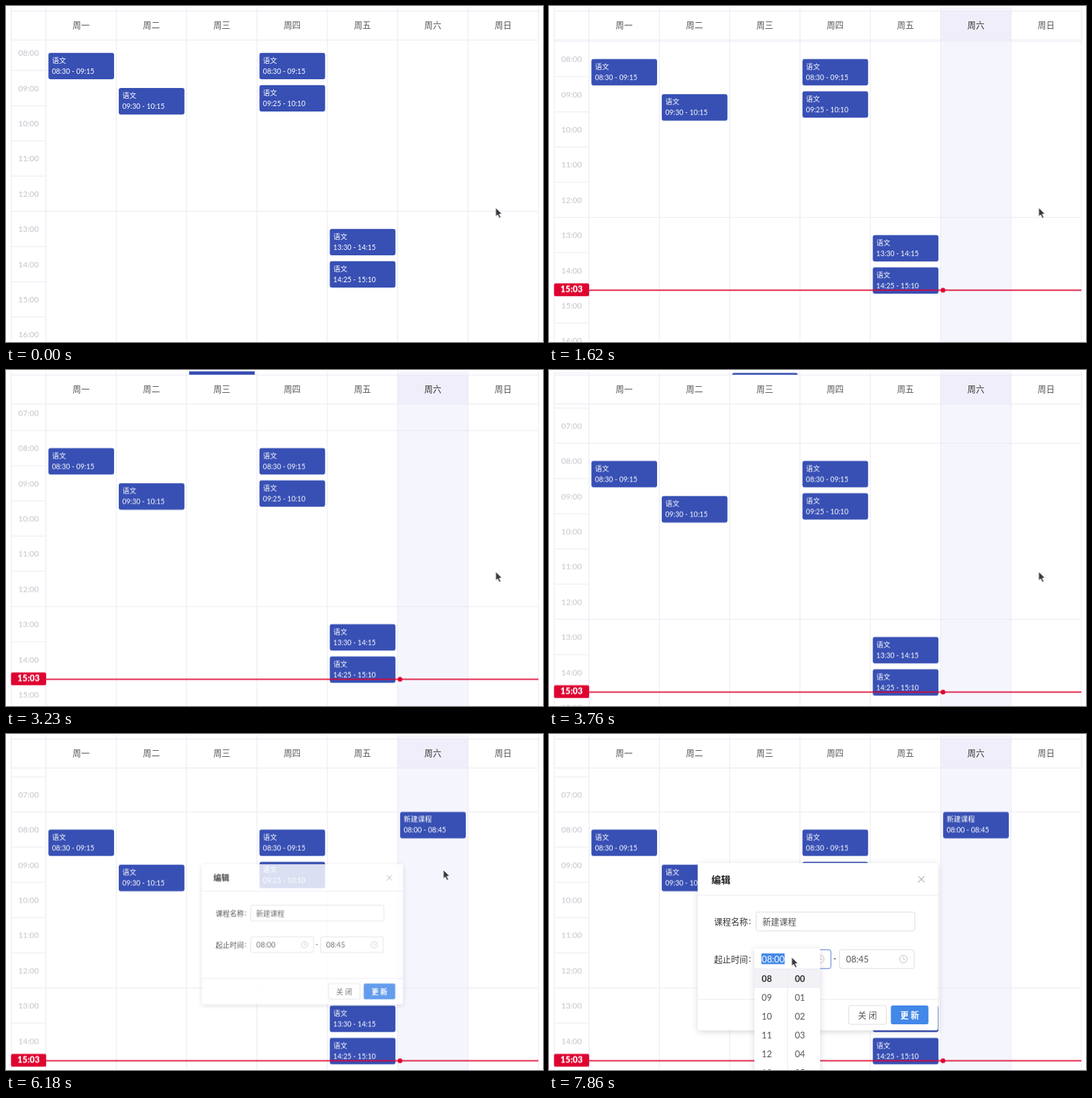
Write an HTML page that moves like this. It is 800 by 500 pixels and loops after 8 s.

```html
<!DOCTYPE html>
<html lang="zh-CN">
<head>
<meta charset="utf-8">
<title>课程表</title>
<style>
html, body { margin: 0; width: 100%; height: 100%; overflow: hidden; background: #fff; }
svg { display: block; width: 100vw; height: 100vh; }
text { font-family: Lato, "Noto Sans CJK SC", sans-serif; font-size: 12.6px; fill: #555; white-space: pre; }
.mid { text-anchor: middle; }
.hour { font-size: 12px; fill: #c3c3cb; }
.lesson { font-size: 10.5px; fill: #fff; }
.clock { font-size: 13.2px; }
.dark { fill: #333; }
.medium { font-weight: 500; }
.bold { font-weight: 700; }
.white { fill: #fff; }
.title { font-size: 14.2px; font-weight: 700; fill: #222; }
.now-label { font-size: 12.8px; font-weight: 900; fill: #fff; }
.rule { stroke: #e9e9f3; fill: none; }
.field { stroke: #dcdce4; fill: #fff; }
.focus { stroke: #5b86dd; }
.icon { stroke: #c2c2ca; fill: none; }
.shadow { filter: drop-shadow(0 2px 5px rgba(30, 30, 60, .17)); }

.scroll, .today, .now, .dot, .added, .modal, .focus, .menu, .cursor { animation: 8s linear infinite; }
.scroll { animation-name: scroll; }
.today { animation-name: today; animation-timing-function: step-end; }
.now { animation-name: settle-y; }
.dot { animation-name: settle-x; }
.added { animation-name: added; animation-timing-function: step-end; }
.modal { animation-name: modal; transform-origin: 655px 202px; }
.focus { animation-name: focus; animation-timing-function: step-end; }
.menu { animation-name: menu; transform-origin: 306px 319px; }
.cursor { animation-name: cursor; }

@keyframes scroll {
  0%, .5% { transform: translateY(70px); animation-timing-function: ease-out; }
  10.12% { transform: translateY(23.5px); }
  15% { transform: translateY(23.5px); animation-timing-function: cubic-bezier(.35, .1, .7, .7); }
  20.25% { transform: translateY(79px); animation-timing-function: cubic-bezier(.3, .85, .6, 1); }
  26.88% { transform: translateY(104px); }
  36.5% { transform: translateY(104px); animation-timing-function: ease-out; }
  40.37% { transform: translateY(116.5px); }
  44.4% { transform: translateY(116.5px); animation-timing-function: ease-out; }
  49.2%, 100% { transform: translateY(142.5px); }
}
@keyframes today { 0% { opacity: 0; } 1.12%, 100% { opacity: 1; } }
@keyframes settle-y { 0%, 9.2% { transform: translateY(-5.7px); } 11.2%, 100% { transform: none; } }
@keyframes settle-x { 0%, 9.2% { transform: translateX(-6px); } 11.2%, 100% { transform: none; } }
@keyframes added { 0% { opacity: 0; } 77.22%, 100% { opacity: 1; } }
@keyframes modal {
  0%, 77.2% { opacity: 0; transform: scale(.838); }
  77.22%, 77.7% { opacity: .82; transform: scale(.838); animation-timing-function: ease-out; }
  80.6%, 100% { opacity: 1; transform: scale(1); }
}
@keyframes focus { 0% { opacity: 0; } 93.5%, 100% { opacity: 1; } }
@keyframes menu {
  0%, 96.08% { opacity: 0; transform: scaleY(.85); }
  96.1% { opacity: .5; transform: scaleY(.85); animation-timing-function: ease-out; }
  98.2%, 100% { opacity: 1; transform: scaleY(1); }
}
@keyframes cursor {
  0%, 57.4% { transform: translate(729.5px, 300px); }
  58.25% { transform: translate(675px, 300px); animation-timing-function: ease-out; }
  61.9% { transform: translate(372.5px, 285px); animation-timing-function: ease-in-out; }
  67.25% { transform: translate(577px, 244px); animation-timing-function: ease-in-out; }
  70% { transform: translate(749px, 225px); animation-timing-function: ease-out; }
  72.75% { transform: translate(651.5px, 202px); }
  83.4% { transform: translate(651.5px, 202px); animation-timing-function: ease-in-out; }
  93.9%, 100% { transform: translate(361.5px, 332px); }
}
</style>
</head>
<body>
<svg id="stage" viewBox="0 0 800 500"></svg>
<script>
const LEFT = 8, GRID = 59.5, COL = 104.8, RIGHT = 793.1, HOUR = 52.4;
const BLUE = '#3850b4', RED = '#de0430', ACCENT = '#4288e8';

const rect = (x, y, w, h, attrs) => `<rect x="${x}" y="${y}" width="${w}" height="${h}" ${attrs}/>`;
const text = (x, y, str, cls = '') => `<text x="${x}" y="${y}" class="${cls}">${str}</text>`;
const path = (d, cls = 'rule') => `<path d="${d}" class="${cls}"/>`;
const group = (cls, ...parts) => `<g class="${cls}">${parts.join('')}</g>`;
const range = (n, fn) => Array.from({ length: n }, (_, i) => fn(i)).join('');

const colX = day => GRID + COL * day;
const hourY = hour => (hour - 8) * HOUR - 26.5;
const two = n => String(n).padStart(2, '0');
const hhmm = hour => `${two(Math.floor(hour))}:${two(Math.round(hour % 1 * 60))}`;

const columns = (top, bottom) =>
  path(`M${LEFT} ${top}V${bottom}` + range(8, i => `M${colX(i)} ${top}V${bottom}`));

function lesson(day, start, name = '语文') {
  const x = colX(day) + 3.7, y = hourY(start);
  return rect(x, y, 97.8, 39.3, `rx="3.2" fill="${BLUE}"`) +
    text(x + 5.2, y + 14.9, name, 'lesson') +
    text(x + 5.2, y + 30.8, `${hhmm(start)} - ${hhmm(start + .75)}`, 'lesson');
}

function hourRow(hour) {
  const y = hourY(hour), end = [8, 13, 18].includes(hour) ? RIGHT : GRID;
  return path(`M${LEFT} ${y}H${end}`) +
    text(33.6, y + 30.6, hhmm(hour), 'hour mid');
}

function nowLine() {
  const y = hourY(15.065);
  return group('today', group('now',
    rect(GRID, y - .9, RIGHT - GRID, 1.8, `fill="${RED}"`),
    `<circle class="dot" cx="587" cy="${y}" r="3.5" fill="${RED}"/>`,
    rect(7.5, y - 10.3, 52.3, 19.2, `rx="2.5" fill="${RED}"`),
    text(33.6, y + 3.2, '15:03', 'now-label mid')));
}

const clockIcon = x =>
  `<circle cx="${x}" cy="335" r="5.6" class="icon"/>` + path(`M${x} 331.5V335.3H${x + 2.8}`, 'icon');

const timeField = (x, value) =>
  rect(x, 321, 111.5, 28, 'rx="3" class="field"') +
  text(x + 10, 339.8, value, 'clock') + clockIcon(x + 95.5);

const button = (x, label, attrs, cls) =>
  rect(x, 404, 56, 28, `rx="3" ${attrs}`) + text(x + 28, 422.7, label, 'mid ' + cls);

const modal = group('modal',
  rect(221.5, 192, 358, 249, 'rx="3" fill="#fff" class="shadow"'),
  text(242, 221.5, '编辑', 'title'),
  '<path d="M550 211.5l9.5 9.5m0 -9.5l-9.5 9.5" stroke="#8c8c92"/>',
  path('M221.5 240H579.5M221.5 395H579.5'),
  text(246, 284, '课程名称', 'dark'), text(297.8, 283.4, ':', 'dark'),
  rect(308.5, 265, 236.5, 28, 'rx="3" class="field"'),
  text(318, 284, '新建课程'),
  text(246, 340, '起止时间', 'dark'), text(297.8, 339.4, ':', 'dark'),
  timeField(308.5, '08:00'),
  text(425.8, 339, '-', 'dark mid'),
  timeField(432.5, '08:45'),
  rect(308.5, 321, 111.5, 28, 'rx="3" fill="none" class="focus"'),
  button(446.5, '关 闭', 'class="field"', ''),
  button(509.3, '更 新', `fill="${ACCENT}"`, 'white bold'));

const options = (x, first) => range(6, i =>
  text(x, 368.7 + 28 * i, two(first + i), i ? 'clock' : 'clock bold dark'));

const menu = group('menu',
  rect(306, 319, 98, 230, 'rx="2" fill="#fff" class="shadow"'),
  rect(316.5, 326.5, 34.5, 16, `fill="${ACCENT}"`),
  text(317, 339.6, '08:00', 'clock white'),
  rect(306, 350, 98, 28, 'fill="#f1f1f6"'),
  path('M306 349.5H404M355.5 350V549'),
  options(316.8, 8), options(366.2, 0));

const header =
  rect(LEFT, 7.5, RIGHT - LEFT, 43.2, 'fill="#fff"') +
  [...'一二三四五六日'].map((d, i) => text(colX(i) + COL / 2, 33.3, '周' + d, 'mid')).join('') +
  group('today',
    rect(colX(5), 7.5, COL, 43.2, 'fill="#efeefa"'),
    text(colX(5) + COL / 2, 33.3, '周六', 'mid medium dark')) +
  columns(7.5, 50.7) +
  path(`M${LEFT} 7.5H${RIGHT}M${LEFT} 50.7H${RIGHT}`);

const schedule = [[0, 8.5], [1, 9.5], [2, 6], [3, 8.5], [3, 9 + 25 / 60], [4, 13.5], [4, 14 + 25 / 60]];

document.getElementById('stage').innerHTML =
  '<clipPath id="page"><rect y="2" width="800" height="498"/></clipPath>' +
  group('today', rect(colX(5), 2, COL, 498, 'fill="#f5f5fd"')) +
  columns(2, 500) +
  '<g clip-path="url(#page)">' +
  group('scroll',
    range(14, i => hourRow(i + 5)),
    ...schedule.map(([day, start]) => lesson(day, start)),
    group('added', lesson(5, 8, '新建课程')),
    nowLine()) +
  '</g>' +
  header + modal + menu +
  group('cursor', '<path d="M0 0V13.4L3 10.7L5.3 15.8L7.7 14.7L5.5 9.8L9.4 9.5Z" fill="#38383e" stroke="#fff" stroke-width=".9"/>');
</script>
</body>
</html>
```
